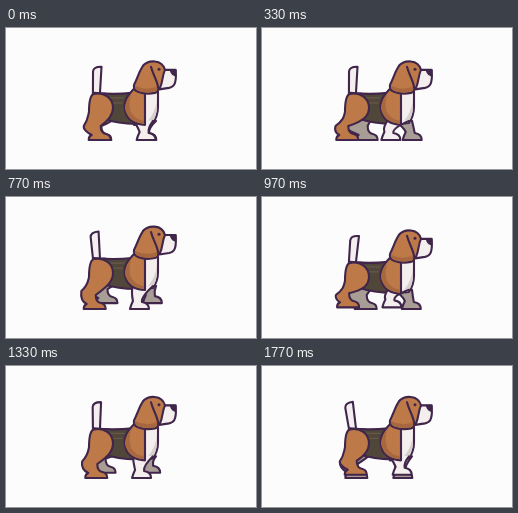
Write an HTML page that moves like this. It is 250 px wide and 141 px high and loops after 1810 ms.

```html
<!DOCTYPE html>
<html>
<head>
<meta charset="utf-8">
<style>
  html, body { margin: 0; width: 100%; height: 100%; overflow: hidden; background: #fcfcfc; }
  svg { display: block; width: 100vw; height: 100vh; }
  path { stroke-linejoin: round; stroke-linecap: round; }
  .line { stroke: #40264a; stroke-width: 2.1; fill: none; }
  .tan { fill: #bd7948; }
  .shade { fill: #a8683f; }
  .cream { fill: #f4efee; }
  .grey { fill: #a89e96; }
  .pale { fill: #d8d0ce; }
  .coat { fill: #51463a; }
  .ink { fill: #40264a; }
</style>
</head>
<body>
<svg viewBox="0 0 250 141">
  <path id="farHind" class="line grey"/>
  <path id="farFront" class="line grey"/>
  <g class="bob">
    <path id="tail" class="line cream" d="M87 66L85 44Q85 39 93 38.5L94 66Z"/>
    <path class="line coat" d="M88 65Q108 67 126 65L130 96Q112 96 97 91Z"/>
    <path d="M102 70H118M107 75H116" stroke="#665a46" stroke-width="1.3"/>
    <path class="line cream" d="M139 64H152V79Q152 88 147 95L128 97Z"/>
    <path class="pale" d="M151 72V79Q151 88 146 95L141 94Q149 86 151 72Z"/>
  </g>
  <path id="nearFront" class="line cream"/>
  <g class="bob">
    <path class="line tan" d="M129 60C121 68 117 74 119 83C121 92 129 97 139 97V60Z"/>
    <path class="shade" d="M125 67C119 74 118 80 120 84C123 92 130 95 138 96V93C126 91 121 82 125 67Z"/>
  </g>
  <path id="nearHind" class="line tan"/>
  <g class="bob">
    <path class="line cream" d="M157 42H169.5Q170.5 50 169 55Q168 59 163 60L150 62Z"/>
    <path class="line tan" d="M137 38C142 32 156 31 159 42C156 48 157 54 154 60L140 62Z"/>
    <path class="line tan" d="M138 37C134 41 132 49 128 57Q127 62 132 64Q140 67 149 65Q153 64 152 59C151 52 147 47 145 39"/>
    <path class="shade" d="M129 58Q140 63 151 59Q152 63 149 64Q140 66 132 63Q128 61 129 58Z"/>
    <circle class="ink" cx="153" cy="41.3" r="1.5"/>
    <path class="ink" d="M163.5 41.5H170.5Q171 48 168.5 48.5Q164.5 47 163.5 41.5Z"/>
  </g>
</svg>
<script>
const LOOP = 1810, FRAMES = 54, CYCLE = 18, GROUND = 112;
const get = id => document.getElementById(id);
const bobbing = document.querySelectorAll('.bob');

// x: middle of the foot, lift: height above ground, b: body bob, hip: sideways hip offset
function hindLeg(x, lift, b, hip) {
  const g = GROUND - lift, hock = 78 + (x - 94) / 2;
  return `M${88 + hip} ${66 + b}C${98 + hip} ${64 + b} ${107 + hip} ${70 + b} ${107 + hip} ${80 + b}
    C${107 + hip} ${88 + b} ${102 + hip} ${93 + b} ${x + 1} ${g - 14}
    Q${x + 1} ${g - 7} ${x + 6} ${g - 6}Q${x + 11} ${g - 5} ${x + 11} ${g}H${x - 11}
    Q${x - 11} ${g - 4} ${x - 8} ${g - 5}C${x - 12} ${g - 7} ${hock - 1} ${g - 11} ${hock} ${98 + b}
    C${82 + hip} ${92 + b} ${82 + hip} ${88 + b} ${83 + hip} ${84 + b}
    C${83 + hip} ${74 + b} ${84 + hip} ${67 + b} ${88 + hip} ${66 + b}Z`;
}

function frontLeg(x, lift, b, hip) {
  const g = GROUND - lift;
  return `M${127 + hip} ${91 + b}Q${x - 8} ${99 + b} ${x - 6} ${g - 8}
    Q${x - 8} ${g - 4} ${x - 9} ${g}H${x + 10}Q${x + 10} ${g - 6} ${x + 3} ${g - 7}
    Q${x + 2} ${g - 12} ${147 + hip} ${93 + b}`;
}

function draw(now) {
  const p = Math.floor(now % LOOP / LOOP * FRAMES) % CYCLE;
  const wave = (shift, period) => Math.cos(2 * Math.PI * (p - shift) / period);
  const swing = wave(-1, CYCLE);
  const bob = -2.25 + 2.25 * wave(0.5, CYCLE / 2);
  const farLift = 6 * Math.max(0, Math.sin(Math.PI * p / 9));
  const nearLift = p > 9 ? 8 * Math.sin(Math.PI * (p - 9.5) / 7.5) : 0;

  for (const g of bobbing) g.setAttribute('transform', `translate(0 ${bob})`);
  get('tail').setAttribute('transform', `rotate(${1 + 8 * wave(1.4, CYCLE / 2)} 90 65)`);
  get('farHind').setAttribute('d', hindLeg(99.5 - 5.5 * swing, farLift, bob, 6));
  get('farFront').setAttribute('d', frontLeg(145 - 5 * swing, farLift, bob, 3));
  get('nearHind').setAttribute('d', hindLeg(89.5 + 4.5 * swing, nearLift, bob, 0));
  get('nearFront').setAttribute('d', frontLeg(134 + 6 * swing, nearLift, bob, 0));
}

let start;
function tick(now) {
  start ??= now;
  draw(now - start);
  requestAnimationFrame(tick);
}
draw(0);
requestAnimationFrame(tick);
</script>
</body>
</html>
```
